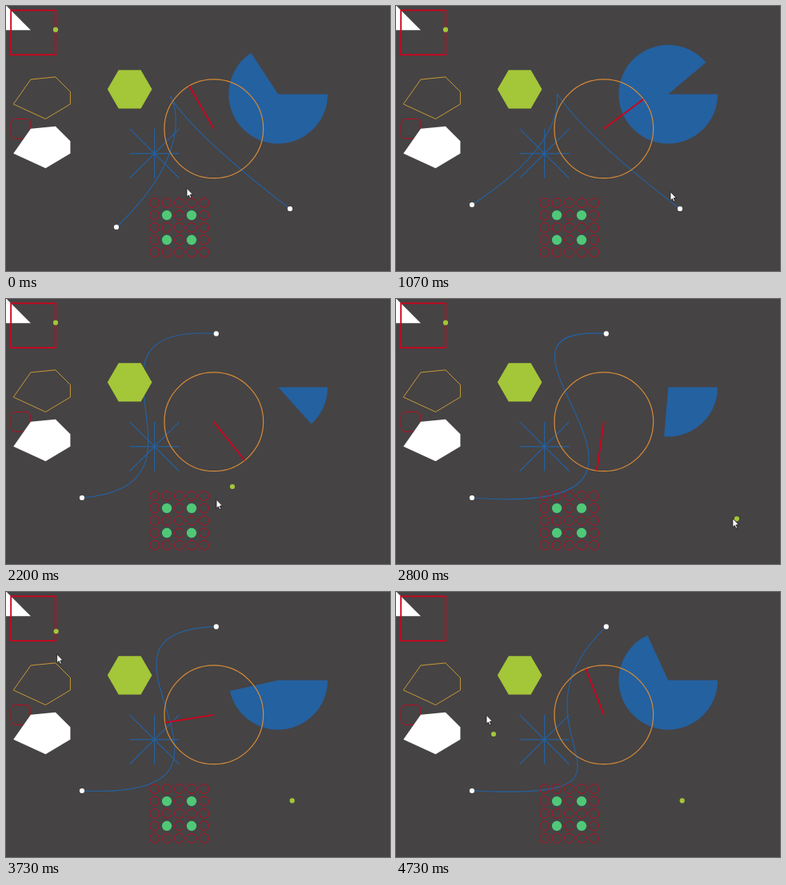
Write an HTML page with a canvas that moves like this. It is 480 px wide and 332 px high and loops after 4.79 s.

```html
<!DOCTYPE html>
<html>
<head>
<meta charset="utf-8">
<style>
html, body { margin: 0; width: 100%; height: 100%; overflow: hidden; background: #454344; }
canvas { display: block; }
</style>
</head>
<body>
<canvas id="stage" width="480" height="332"></canvas>
<script>
const ctx = document.getElementById('stage').getContext('2d');
const LOOP = 4790, SCALE = 0.6186, SHIFT = -0.8;
const BLUE = '#2461a0', GREEN = '#a4c639', RED = '#d0021b', DARK_RED = '#b80d20', WHITE = '#fff';

// Pointer route in stage pixels: [step, x, y].
const route = [
  [-1.5, 138, 277], [0, 226, 229], [8.5, 40, 253], [10, 73, 219], [11.5, 95, 249],
  [15.5, 355, 254], [21.5, 211, 7], [23, 269, 3], [25, 262.8, 43.4],
  [27.5, 325, 100], [31.5, 283, 235], [33, 263, 252], [39, 431, 275], [48.5, 399, 277],
  [50, 367, 266], [51.5, 357.7, 261.4],
  [53.5, 62, 29.7], [59.5, 66, 147], [61, 65, 122], [69.5, 122, 178], [71, 113, 155]
];
// Dragged points trail the pointer while they are held.
const LAG = 1.5;
const held = { start: [-1.5, 11.5], end: [15.5, 25], handleA: [27.5, 51.5], handleB: [53.5, 71] };

function pointerAt(step) {
  const i = Math.max(1, route.findIndex(key => key[0] >= step));
  const [s0, x0, y0] = route[i - 1], [s1, x1, y1] = route[i];
  const u = (step - s0) / (s1 - s0);
  return [x0 + (x1 - x0) * u, y0 + (y1 - y0) * u];
}

function dragged(name, step) {
  const [from, to] = held[name];
  return pointerAt(Math.min(to, Math.max(from, step - LAG)));
}

function paint(fill, stroke, width = 1) {
  if (fill) { ctx.fillStyle = fill; ctx.fill(); }
  if (stroke) { ctx.strokeStyle = stroke; ctx.lineWidth = width; ctx.stroke(); }
}

function circle(x, y, r, fill, stroke, width) {
  ctx.beginPath();
  ctx.arc(x, y, r, 0, Math.PI * 2);
  paint(fill, stroke, width);
}

function polygon(points, fill, stroke, width) {
  ctx.beginPath();
  points.forEach(([x, y]) => ctx.lineTo(x, y));
  ctx.closePath();
  paint(fill, stroke, width);
}

function ray(x, y, angle, from, to, color, width) {
  const dx = Math.cos(angle), dy = Math.sin(angle);
  ctx.beginPath();
  ctx.moveTo(x + from * dx, y + from * dy);
  ctx.lineTo(x + to * dx, y + to * dy);
  paint(null, color, width);
}

function roundedSquare(x, y, size, radius, color, width) {
  ctx.beginPath();
  ctx.roundRect(x, y, size, size, radius);
  paint(null, color, width);
}

function drawCorner() {
  polygon([[0, 0], [50, 50], [0, 50]], WHITE);
  roundedSquare(10, 10, 90, 0, RED, 3);
}

function drawCurve(step) {
  const [p, a, b, q] = ['start', 'handleA', 'handleB', 'end'].map(name => dragged(name, step));
  ctx.beginPath();
  ctx.moveTo(...p);
  ctx.bezierCurveTo(...a, ...b, ...q);
  paint(null, BLUE, 1.2);
  [a, b].forEach(c => circle(...c, 3.1, GREEN));
  [p, q].forEach(c => circle(...c, 3.1, WHITE));
}

function drawGrid() {
  for (let row = 0; row < 5; row++) {
    for (let col = 0; col < 5; col++) {
      const x = 300 + col * 25, y = 400 + row * 25;
      if (row % 2 && col % 2) circle(x, y, 10, '#50c878');
      else circle(x, y, 9.5, null, DARK_RED, 1.6);
    }
  }
}

function drawStar() {
  for (let i = 0; i < 4; i++) {
    const r = i % 2 ? 50 * Math.SQRT2 : 50;
    ray(300, 300, i * Math.PI / 4, -r, r, BLUE, 2);
  }
}

function drawSpinner(step) {
  const degrees = 240.2 + 5.19 * step;
  const sweep = (degrees - 3.4) % 360 * Math.PI / 180;
  ctx.beginPath();
  ctx.moveTo(550, 180);
  ctx.arc(550, 180, 100, 0, sweep);
  paint(BLUE);
  circle(420, 250, 100, null, '#d68a36', 2);
  ray(420, 250, degrees * Math.PI / 180, 0, 100, RED, 3);
}

function drawPolygons() {
  const gem = [[50, 150], [100, 145], [130, 175], [130, 200], [80, 230], [15, 200]];
  polygon(gem, null, '#c99a35', 1.6);
  roundedSquare(10, 230, 40, 10, DARK_RED, 1.6);
  polygon(gem.map(([x, y]) => [x, y + 100]), WHITE);
  const hexagon = Array.from({ length: 6 }, (_, i) => {
    const a = i * Math.PI / 3;
    return [250 + 45 * Math.cos(a), 170 + 45 * Math.sin(a)];
  });
  polygon(hexagon, GREEN);
}

function drawPointer(step) {
  const [x, y] = pointerAt(step);
  const arrow = [[0, 0], [0, 11], [2.4, 8.6], [4, 12.4], [5.8, 11.7], [4.2, 8], [7.5, 7.8]];
  polygon(arrow.map(([dx, dy]) => [x + dx, y + dy - 0.7]), WHITE, '#151515', 0.8);
}

const useStage = () => ctx.setTransform(1, 0, 0, 1, 0, 0);
const useScene = () => ctx.setTransform(SCALE, 0, 0, SCALE, 0, SHIFT);

function frame(time) {
  const step = Math.floor((time % LOOP + 3.4) * 0.015);
  useStage();
  ctx.fillStyle = '#454344';
  ctx.fillRect(0, 0, 480, 332);
  useScene();
  drawCorner();
  useStage();
  drawCurve(step);
  useScene();
  drawGrid();
  drawStar();
  drawSpinner(step);
  drawPolygons();
  useStage();
  drawPointer(step);
}

let origin;
function tick(now) {
  origin ??= now;
  frame(now - origin);
  requestAnimationFrame(tick);
}
frame(0);
requestAnimationFrame(tick);
</script>
</body>
</html>
```
